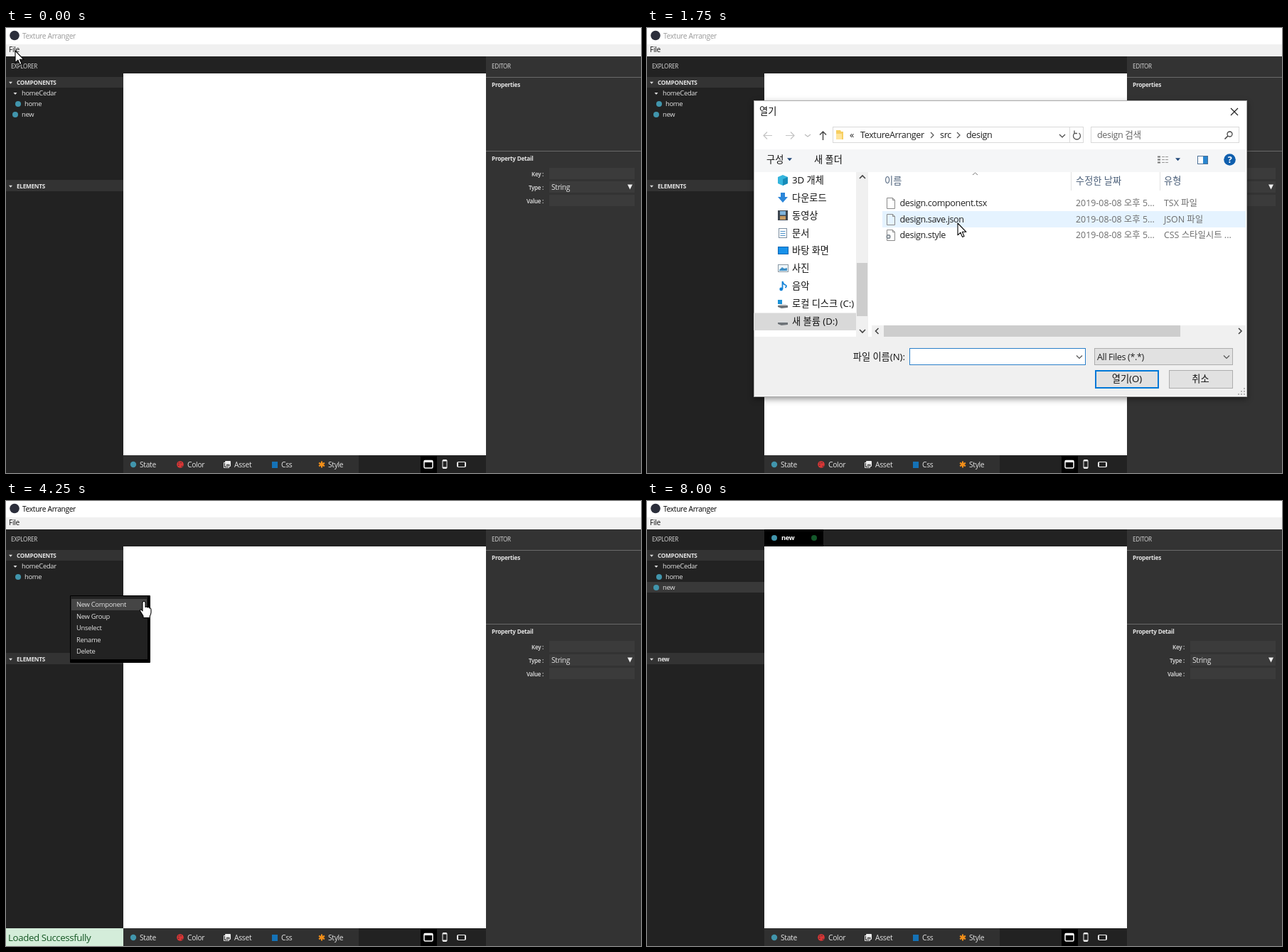
Animation of 893 by 627 pixels, one loop 8.25 s. Source, as an HTML page:

```html
<!DOCTYPE html>
<html lang="ko">
<head>
<meta charset="utf-8">
<title>Texture Arranger</title>
<style>
html, body { margin: 0; width: 100%; height: 100%; overflow: hidden; background: #fff; }
svg { display: block; width: 100%; height: 100%; }
text {
  font: 9.4px "Open Sans", "Noto Sans CJK KR", "Noto Sans CJK", sans-serif;
  letter-spacing: -.03em; fill: #e4e4e4; white-space: pre;
}
.title { font-size: 10.2px; }
.file { font-size: 10.2px; fill: #111; }
.cap { font-size: 8.1px; fill: #ddd; }
.bold { font-size: 8.2px; font-weight: 700; }
.label { font-size: 8px; font-weight: 600; text-anchor: end; }
.tool { font-size: 10.3px; }
.tab { font-size: 9.2px; font-weight: 700; fill: #fff; }
.status { font-size: 13.3px; fill: #155724; }
.ui { font-size: 12.6px; fill: #222; }
.ko { font-size: 13.2px; letter-spacing: 0; fill: #111; }
.head { fill: #4c607a; }
.hint { fill: #666; }
.meta { font-size: 12.4px; letter-spacing: 0; fill: #6d6d6d; }
.mid { text-anchor: middle; }
.end { text-anchor: end; }
.help { fill: #fff; font-weight: 700; }
#dialog { transform-origin: 496px 311px; filter: drop-shadow(0 3px 4px rgba(0, 0, 0, .4)); }
</style>
</head>
<body>
<svg id="stage" viewBox="0 0 893 627"></svg>
<script>
const LOOP = 8250, STEP = 250;

const rect = (x, y, w, h, fill, extra = '') =>
  `<rect x="${x}" y="${y}" width="${w}" height="${h}" fill="${fill}" ${extra}/>`;
// frame drawn inside the given box
const box = (x, y, w, h, fill, stroke, sw = 1) =>
  rect(x + sw / 2, y + sw / 2, w - sw, h - sw, fill, `stroke="${stroke}" stroke-width="${sw}"`);
const dot = (x, y, r, fill) => `<circle cx="${x}" cy="${y}" r="${r}" fill="${fill}"/>`;
const line = (d, stroke, w = 1) => `<path d="${d}" fill="none" stroke="${stroke}" stroke-width="${w}"/>`;
const shape = (d, fill) => `<path d="${d}" fill="${fill}"/>`;
const text = (x, y, s, cls = '') => `<text x="${x}" y="${y}" class="${cls}">${s}</text>`;
const down = (x, y, w, fill) => shape(`M${x - w / 2} ${y - w / 4}h${w}l${-w / 2} ${w / 1.7}z`, fill);
const chevron = (x, y, dx, dy, c = '#555', w = 1.2) =>
  line(dx ? `M${x - dx / 2} ${y - 4}l${dx} 4l${-dx} 4` : `M${x - 4} ${y - dy / 2}l4 ${dy}l4 ${-dy}`, c, w);
// group shown only within "from-to" ranges (ms)
const during = (ranges, body) => `<g data-on="${ranges}">${body}</g>`;

const CYAN = '#4195ac';

function explorer() {
  return rect(0, 40, 165, 587, '#222') +
    text(7, 57.4, 'EXPLORER', 'cap') +
    rect(0, 69, 165, 15, '#333') + down(6.5, 77, 5, '#ddd') + text(15, 79.5, 'COMPONENTS', 'bold') +
    down(13, 92.3, 5, '#ddd') + text(22, 95.3, 'homeCedar') +
    dot(17, 107, 4, CYAN) + text(26, 110.3, 'home') +
    during('6750-8250', rect(0, 114, 165, 15, '#393939')) +
    during('0-2750 5500-8250', dot(13, 122, 4, CYAN) + text(22, 125.3, 'new')) +
    during('4500-5500', rect(8, 114, 157, 16, '#3c3c3c')) +
    during('5000-5250', text(22, 125.3, 'n')) +
    during('5250-5500', text(22, 125.3, 'new')) +
    rect(0, 214, 165, 16, '#333') + down(6.5, 223, 5, '#ddd') +
    during('0-7250', text(15, 225.6, 'ELEMENTS', 'bold')) +
    during('7250-8250', text(15, 225.8, 'new', 'bold'));
}

function editor() {
  return rect(675, 40, 218, 587, '#333') +
    text(683, 57.4, 'EDITOR', 'cap') +
    rect(675, 69, 218, 1, '#6a6a6a') + text(683, 83, 'Properties', 'bold') +
    rect(675, 173, 218, 1, '#6a6a6a') + text(683, 187.2, 'Property Detail', 'bold') +
    ['Key :', 'Type :', 'Value :'].map((s, i) =>
      rect(764, 197 + 19 * i, 120, 16, '#3b3b3b') + text(756, 209 + 19 * i, s, 'label')).join('') +
    text(767, 228, 'String', 'tool') + shape('M874 220.5h7l-3.5 7z', '#eee');
}

function toolbar() {
  const petals = [0, 60, 120].map(a =>
    `<path d="M444 610.5v9" stroke="#f39019" stroke-width="2.1" transform="rotate(${a} 444 615)"/>`).join('');
  return rect(165, 602, 510, 25, '#222') + rect(165, 602, 331, 25, '#303030') +
    dot(179, 615, 4.2, CYAN) +
    dot(245, 615, 4.8, '#d93636') + [[243, 613], [246, 612.6], [242.7, 616], [247.5, 617.5]]
      .map(([x, y]) => dot(x, y, .8, '#303030')).join('') +
    box(306, 612, 8, 8, 'none', '#ddd') + rect(308, 610, 8, 8, '#eee', 'rx="1"') +
    shape('M309 617l2-3 1.5 1.5 1.2-1.5 1.5 3z', '#555') +
    rect(374, 611, 8, 9, '#1572b6') + petals +
    ['State', 'Color', 'Asset', 'Css', 'Style'].map((s, i) =>
      text([188, 255, 321, 387, 453][i], 618.8, s, 'tool')).join('') +
    rect(583, 603, 23, 24, '#000') +
    rect(588, 609.5, 12, 10.5, 'none', 'rx="1.5" stroke="#fff" stroke-width="1.5"') + rect(588, 609, 12, 3, '#fff') +
    rect(614, 608.5, 6, 12, 'none', 'rx="1" stroke="#eee"') + rect(614, 609, 6, 1.5, '#eee') + rect(614, 618.5, 6, 1.5, '#eee') +
    rect(634.5, 611.5, 12, 7, 'none', 'rx="1" stroke="#eee"') + rect(634.5, 612, 1.5, 6, '#eee') + rect(645, 612, 1.5, 6, '#eee');
}

const page = (x, y) => line(`M${x + .5} ${y - 7.5}h8l3 3v12h-11z`, '#8a8a8a') + line(`M${x + 8.5} ${y - 7.5}v3h3`, '#8a8a8a');
const drive = y => shape(`M184 ${y}l4-2h7l3 2z`, '#d5d8da') + shape(`M184 ${y}h14v3l-9 1-5-2z`, '#6e7378');

function sidebarEarly() {
  const icons = [
    shape('M184 222l2 5 5.5.4-4.2 3.6 1.4 5.4-4.7-3-4.7 3 1.4-5.4-4.2-3.6 5.5-.4z', '#3c9be8'),
    rect(178, 258, 12, 12, '#e9a15c'),
    dot(183, 297.5, 6, '#1579d0'),
    rect(178, 325, 11, 7, '#57aee0') + rect(182, 333, 9, 2, '#9aa4ac'),
    rect(179, 357, 9, 8, '#3f97cf') + dot(181, 366, 4, '#6fb7e2')
  ];
  return rect(150, 318, 161, 24.5, '#d9d9d9') +
    ['바로 가기', 'Painted Meadow Files', 'FogShelf', '내 PC', '네트워크'].map((s, i) =>
      icons[i] + text(195.5, 234.4 + 33.2 * i, s, i === 1 || i === 2 ? 'ui' : 'ko')).join('');
}

function sidebar() {
  const icons = [
    shape('M184 210l7-3 7 3v9l-7 3-7-3z', '#35b5dd') + shape('M191 213l7-3v9l-7 3z', '#178cb9'),
    shape('M188 232h6v6h4l-7 8-7-8h4z', '#2b86d9'),
    rect(184, 257, 14, 14, '#3d4650') + rect(187, 258, 8, 5.5, '#7fb4dc') + rect(187, 265, 8, 5, '#c79b62'),
    box(185, 282, 12, 14, '#fff', '#7b8ea0') + line('M187.5 286.5h7M187.5 289.5h7M187.5 292.5h7', '#4f93c9'),
    box(184, 308, 15, 11, '#1791ea', '#0b66b3'),
    box(184, 333, 15, 11, '#eef6fb', '#8a98a3') + shape('M186 341l4-4 3 2 4-1v4h-11z', '#3f8fc4'),
    line('M190.5 368v-11q1 4 4 5t0 4', '#1583d8', 1.8) + dot(188.7, 368, 2.4, '#1583d8'),
    rect(184, 383, 6, 6, '#1c93d8') + drive(391),
    drive(415)
  ];
  const names = ['3D 개체', '다운로드', '동영상', '문서', '바탕 화면', '사진', '음악', '로컬 디스크 (C:)', '새 볼륨 (D:)'];
  return rect(150, 401.5, 144, 24.5, '#d9d9d9') +
    names.map((s, i) => icons[i] + text(204, 218.8 + 24.9 * i, s, 'ko')).join('') +
    rect(294, 203, 17, 232, '#f0f0f0') + rect(295, 331, 15, 75, '#cdcdcd') +
    line('M299 212l4-4 4 4M299 425l4 4 4-4', '#444', 1.6);
}

function dialog() {
  const address = line('M176 151.5h-12m5-5l-5 5 5 5M195 151.5h12m-5-5l5 5-5 5', '#c4c4c4', 1.2) +
    chevron(226, 151.5, 0, 3, '#bbb') + line('M247.5 158v-12m-4.5 4.5l4.5-4.5 4.5 4.5', '#444', 1.4) +
    box(261, 139, 353, 23, '#fff', '#d9d9d9') + rect(594, 140, 1, 21, '#d9d9d9') +
    shape('M266 144h6l1 2h3v11h-10z', '#f7cf62') + rect(266, 149, 8, 8, '#ffe49a') +
    text(285, 155, '«', 'ui') + text(300, 155.3, 'TextureArranger', 'ui') + chevron(401, 151, 4) +
    text(412, 155.3, 'src', 'ui') + chevron(438, 151, 4) + text(449, 155.3, 'design', 'ui') +
    chevron(584, 152, 0, 4, '#444') +
    line('M607.5 148a5 5 0 1 1-6 0M601 144.5v4h4', '#555', 1.3) +
    box(624, 139, 209, 23, '#fff', '#d9d9d9') + text(633, 155.3, 'design 검색', 'ui hint') +
    `<circle cx="819.5" cy="149.5" r="3.5" fill="none" stroke="#444" stroke-width="1.3"/>` + line('M817 152l-4.5 4.5', '#444', 1.6);

  const commands = rect(151, 171, 691, 32, '#f5f6f7') +
    during('1250-2750', text(168, 189.8, '구성', 'ko') + down(200.5, 185, 7, '#234a7a') + text(235, 189.8, '새 폴더', 'ko') +
      line('M718 181.5h4M718 185.5h4M718 189.5h4', '#777', 2) + line('M724 181.5h4m1 0h4M724 185.5h4m1 0h4M724 189.5h4m1 0h4', '#999') +
      down(746.5, 185, 7, '#234a7a')) +
    box(774, 180, 15, 12, '#fff', '#4a6f95') + rect(782, 181, 6, 10, '#2a86cf') +
    dot(819.5, 185.5, 8.3, '#0f5fae') + text(819.5, 190, '?', 'ui mid help');

  const kinds = ['TSX 파일', 'JSON 파일', 'CSS 스타일시트 ...'];
  const list = text(334, 219.5, '이름', 'ko head') + text(603, 219.5, '수정한 날짜', 'ko head') + text(727, 219.5, '유형', 'ko head') +
    line('M458 207l3.5-3 3.5 3', '#777') + rect(596, 203, 1, 26, '#e2e2e2') + rect(721, 203, 1, 26, '#e2e2e2') +
    during('1750-2000', rect(331, 258, 511, 23, '#e5f3ff')) +
    during('2000-2750', rect(331, 258, 511, 23, '#cce8ff')) +
    ['design.component.tsx', 'design.save.json', 'design.style'].map((s, i) => {
      const y = 247 + 22.5 * i;
      return page(337, Math.round(y)) + text(355.5, y + 4.4, s, 'ui') +
        text(603, y + 4.4, '2019-08-08 오후 5...', 'meta') + text(727, y + 4.4, kinds[i], 'meta');
    }).join('') +
    dot(339.5, 294, 3.2, '#8b949c') + dot(339.5, 294, 1.2, '#fff') +
    rect(316, 419, 526, 16, '#f0f0f0') + rect(333, 419, 417, 16, '#cdcdcd') +
    line('M325.5 423l-4 4 4 4M832 423l4 4-4 4', '#444', 1.6);

  const grip = [[0, 0], [-4, 0], [-8, 0], [0, -4], [-4, -4], [0, -8]]
    .map(([x, y]) => rect(839 + x, 515 + y, 2, 2, '#b5b5b5')).join('');
  const footer = rect(151, 435, 691, 83, '#f0f0f0') +
    text(363, 467.8, '파일 이름(N):', 'ko end') + box(369, 451, 248, 24, '#fff', '#2a7fc9') +
    during('1000-1250', rect(373, 455, 1, 16, '#111')) +
    during('2000-2750', text(373, 467.6, 'design.save.json', 'ui')) + chevron(608, 463.5, 0, 4) +
    box(629, 451, 195, 24, '#e1e1e1', '#adadad') + text(633, 467.8, 'All Files (*.*)', 'ui') + chevron(815, 463.5, 0, 4) +
    box(630, 482, 90, 26, '#e1e1e1', '#0078d7', 2) + text(675, 499.3, '열기(O)', 'ko mid') +
    box(734, 482, 90, 26, '#e1e1e1', '#adadad') + text(778.5, 499.3, '취소', 'ko mid') + grip;

  return `<g id="dialog" data-on="1000-2750">` + box(150, 102, 694, 418, '#fff', '#aaa') +
    text(158, 122, '열기', 'ko') + line('M821 113l10 10m0-10l-10 10', '#222', 1.2) +
    address + commands +
    during('1000-1250', sidebarEarly()) + during('1250-2750', sidebar()) +
    list + footer + '</g>';
}

function contextMenu() {
  return during('4000-4500', rect(90, 133, 113, 95, '#000', 'rx="1"') + rect(91, 134, 108, 89, '#222') +
    during('4250-4500', rect(92, 138, 106, 16, '#454545')) +
    ['New Component', 'New Group', 'Unselect', 'Rename', 'Delete'].map((s, i) =>
      text(99, 149.3 + 16.5 * i, s)).join(''));
}

const ARROW = 'M0 0V16.8L3.9 13.2 6.5 19.4 9 18.4 6.4 12.3H11.9Z';
const HAND = 'M-2 2Q0-1.5 2 2V8.5Q4 7 5 9 7 7.7 7.7 10 9.8 9.3 10 12V16Q9.8 19 8.3 21V23.5H-1V21L-4.7 15Q-6.5 11.5-3.7 11.8L-2 14Z';

const stage = document.getElementById('stage');
stage.innerHTML =
  rect(0, 0, 893, 627, '#fff') + rect(0, 23, 893, 17, '#f0f0f0') +
  dot(12, 10.5, 6.8, '#2b2e3b') +
  `<text id="title" x="23" y="14.5" class="title">Texture Arranger</text>` + text(4, 34.4, 'File', 'file') +
  rect(165, 40, 510, 24, '#222') + explorer() + editor() + toolbar() +
  during('7250-8250', rect(165, 40, 83, 24, '#000') + dot(179, 52, 4, CYAN) + text(189, 55.3, 'new', 'tab') + dot(235, 52, 4, '#14582b')) +
  `<g id="status">${rect(0, 602, 165, 25, '#d4edda')}${during('2750-6000', text(3, 619.8, 'Loaded Successfully', 'status'))}</g>` +
  contextMenu() + dialog() +
  `<path id="cursor" fill="#fff" stroke="#000" stroke-width="1.1" stroke-linejoin="round"/>`;

const [title, status, dialogBox, cursor] = ['title', 'status', 'dialog', 'cursor'].map(id => document.getElementById(id));
const timed = [...stage.querySelectorAll('[data-on]')].map(el =>
  [el, el.dataset.on.split(' ').map(r => r.split('-').map(Number))]);

// [time, x, y]
const route = [
  [0, 13, 32], [250, 13, 32], [750, 152, 75], [1000, 152, 75], [1250, 318, 185], [1500, 405, 252],
  [1750, 437, 275], [2000, 437, 275], [2500, 675, 500], [3000, 380, 366], [3750, 91, 134],
  [4000, 91, 134], [4250, 194, 141], [4500, 184, 144], [6000, 184, 144], [6750, 45, 119],
  [7500, 45, 119], [7750, 10, 100]
];
// [time, opacity]
const fade = [[2750, 0], [3000, .12], [3250, .65], [3500, 1], [5750, 1], [6000, .84], [6250, .4], [6500, .1], [6750, 0]];

function at(keys, t, k) {
  const i = keys.findIndex(p => p[0] > t);
  if (i < 0) return keys[keys.length - 1][k];
  if (!i) return keys[0][k];
  const a = keys[i - 1], b = keys[i];
  return a[k] + (b[k] - a[k]) * (t - a[0]) / (b[0] - a[0]);
}

let shown = -1;
function draw(now) {
  const t = Math.floor(now % LOOP / STEP) * STEP;
  if (t !== shown) {
    shown = t;
    for (const [el, ranges] of timed)
      el.style.display = ranges.some(([a, b]) => t >= a && t < b) ? '' : 'none';
    title.style.fill = t < 2750 ? '#999' : '#000';
    status.style.opacity = at(fade, t, 1);
    dialogBox.style.opacity = t < 1250 ? .64 : 1;
    dialogBox.style.transform = t < 1250 ? 'scale(.984)' : 'none';
    const hand = t === 4250 || (t >= 6750 && t < 7750);
    cursor.setAttribute('d', hand ? HAND : ARROW);
    cursor.setAttribute('transform', `translate(${at(route, t, 1)} ${at(route, t, 2)})`);
    cursor.style.display = t < 8000 ? '' : 'none';
  }
  requestAnimationFrame(draw);
}
draw(performance.now());
</script>
</body>
</html>
```
